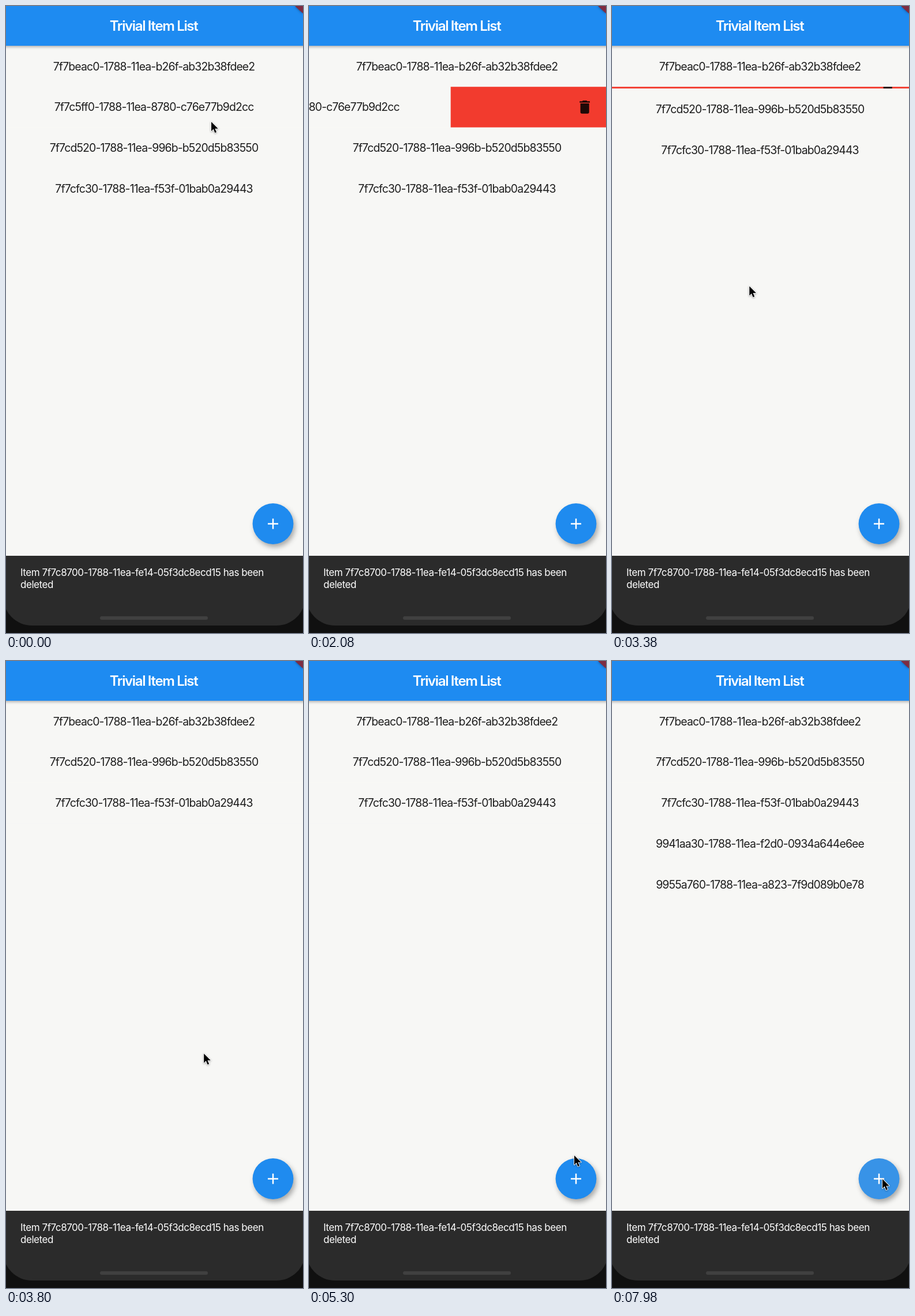
These frames come from a looping animation (515 by 1088 pixels, 8000 ms). An HTML page:

```html
<!DOCTYPE html>
<html lang="en">
<head>
<meta charset="utf-8">
<title>Trivial Item List</title>
<style>
  html, body { margin: 0; width: 100%; height: 100%; overflow: hidden; background: #f7f7f5; }
  svg { display: block; font-family: Inter, "Liberation Sans", sans-serif; }
  .row text { font-size: 19.4px; letter-spacing: -.87px; text-anchor: middle; fill: #1e1e1e; }
  .row rect { fill: #f7f7f5; }
  .title { font-size: 24px; font-weight: 600; letter-spacing: -1.35px; text-anchor: middle; fill: #fff; }
  .snack { font-size: 17px; letter-spacing: -.45px; fill: #fff; }
  .bar { filter: drop-shadow(0 2px 2.5px rgba(0, 0, 0, .3)); }
  .fab { filter: drop-shadow(3px 5px 4px rgba(0, 0, 0, .32)); }
  .banner { filter: drop-shadow(0 0 2px rgba(0, 0, 0, .5)); }
  #cursor { filter: drop-shadow(0 1.5px 1.5px rgba(0, 0, 0, .35)); }
</style>
</head>
<body>
<svg width="515" height="1088" viewBox="0 0 515 1088">
  <defs>
    <clipPath id="disc"><circle cx="463" cy="898.5" r="35.4"/></clipPath>
  </defs>
  <rect width="515" height="1088" fill="#f7f7f5"/>

  <svg id="tray" y="140" width="515">
    <rect width="515" height="71" fill="#f23b2e"/>
    <path id="trash" fill="#1f0907" d="M6 19c0 1.100.9 2 2 2h8c1.100 0 2-.9 2-2V7H6v12zM19 4h-3.500l-1-1h-5l-1 1H5v2h14V4z"/>
  </svg>
  <g id="rows"></g>

  <rect class="bar" x="-10" y="-10" width="535" height="79" fill="#1e8bf1"/>
  <text class="title" x="256" y="43">Trivial Item List</text>
  <path class="banner" d="M501 0h14v13z" fill="#7d2c42"/>

  <rect y="954" width="515" height="134" fill="#101010"/>
  <path d="M-5 954H519V1025a50 50 0 0 1-50 50H45a50 50 0 0 1-50-50z" fill="#2b2b2b"/>
  <text class="snack" x="25" y="988.5">Item 7f7c8700-1788-11ea-fe14-05f3dc8ecd15 has been</text>
  <text class="snack" x="25" y="1010">deleted</text>
  <rect x="163" y="1059" width="187" height="6" rx="3" fill="#404040"/>

  <circle class="fab" cx="463" cy="898.5" r="35.4" fill="#1f8bef"/>
  <g clip-path="url(#disc)">
    <circle id="glow" cx="463" cy="898.5" r="36" fill="#bcbcbc"/>
    <circle class="splash" cx="469" cy="898" fill="#c8c8c8"/>
    <circle class="splash" cx="469" cy="898" fill="#c8c8c8"/>
  </g>
  <path d="M454 898.500h18M463 889.500v18" stroke="#fff" stroke-width="2.5"/>

  <path id="cursor" d="M0 0V18L4 14 7 21 10 20 7 13H13z"
        fill="#000" stroke="#fff" stroke-width="2" stroke-linejoin="round" paint-order="stroke"/>
</svg>

<script>
const LOOP = 8000, TOP = 69.2, ROW = 70.8, WIDTH = 523.4;
const SWIPED = 1, FIRST_NEW = 4;
const taps = [7160, 7620];
const ids = [
  '7f7beac0-1788-11ea-b26f-ab32b38fdee2',
  '7f7c5ff0-1788-11ea-8780-c76e77b9d2cc',
  '7f7cd520-1788-11ea-996b-b520d5b83550',
  '7f7cfc30-1788-11ea-f53f-01bab0a29443',
  '9941aa30-1788-11ea-f2d0-0934a644e6ee',
  '9955a760-1788-11ea-a823-7f9d089b0e78'
];

const $ = id => document.getElementById(id);
const set = (el, attrs) => { for (const k in attrs) el.setAttribute(k, attrs[k]); };
const shown = on => on ? 'visible' : 'hidden';

// Progress of t from a to b, limited to 0..1
const span = (t, a, b) => Math.min(1, Math.max(0, (t - a) / (b - a)));
const mix = (p, q, k) => p.map((v, i) => v + (q[i] - v) * k);
const easeOut = k => 1 - (1 - k) ** 2;
const ease = k => 1 - (1 - k ** 1.5) ** 3.7;

// The finger drags ever faster, rests near the edge, then the row flies out
function swipe(t) {
  const dragged = WIDTH * .874;
  return dragged * span(t, 1640, 2240) ** 1.68 + (WIDTH - dragged) * span(t, 2370, 2520);
}

const rest = [356, 201], grab = [437, 188], back = [88, 207];
const middle = [343, 681], button = [460, 858], plus = [469, 899];

function pointer(t) {
  if (t < 1640) return mix(rest, grab, easeOut(span(t, 840, 1560)));
  if (t < 3800) return mix(back, middle, span(t, 2780, 3800));
  if (t < 6140) return mix(middle, button, easeOut(span(t, 3800, 5200)));
  return mix(button, plus, easeOut(span(t, 6140, 6460)));
}

const rows = ids.map(id => {
  const g = document.createElementNS('http://www.w3.org/2000/svg', 'g');
  g.setAttribute('class', 'row');
  g.innerHTML = `<rect x="-5" width="${WIDTH}" height="71"/><text x="256.5" y="42.4">${id}</text>`;
  $('rows').append(g);
  return g;
});
const splashes = document.querySelectorAll('.splash');

function draw(t) {
  const shift = swipe(t);
  const height = ROW * (1 - ease(span(t, 2959, 3579)));

  set($('tray'), { height, visibility: shown(shift > 0 && height > .1) });
  set($('trash'), { transform: `translate(463 ${height / 2 - 15.2}) scale(1.264)` });

  let y = TOP;
  rows.forEach((row, i) => {
    const swiped = i === SWIPED;
    set(row, {
      transform: `translate(${swiped ? -shift : 0} ${y})`,
      visibility: shown(i < FIRST_NEW || t >= taps[i - FIRST_NEW])
    });
    y += swiped ? height : ROW;
  });

  set($('cursor'), {
    transform: `translate(${pointer(t).join(' ')}) scale(.9)`,
    visibility: shown(t < 1640 || t >= 2780)
  });

  set($('glow'), { opacity: .16 * easeOut(span(t, 6980, 7400)) });
  splashes.forEach((el, i) => {
    const k = span(t, taps[i] - 180, taps[i] + 340);
    set(el, { r: 45 * Math.sqrt(k), opacity: .16 * (1 - k) });
  });
}

const start = performance.now();
function tick() {
  draw((performance.now() - start) % LOOP);
  requestAnimationFrame(tick);
}
draw(0);
requestAnimationFrame(tick);
</script>
</body>
</html>
```
